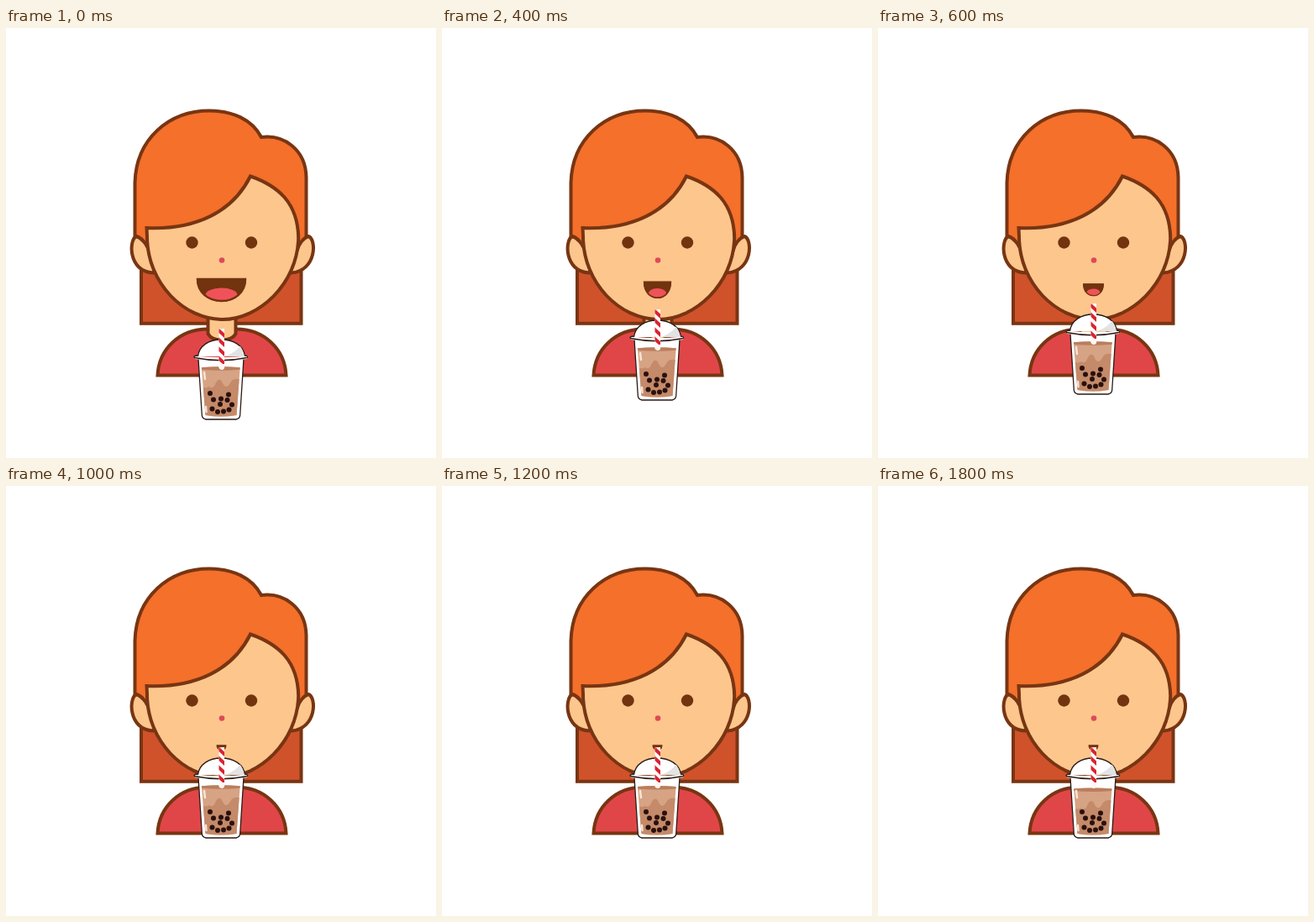
An HTML page for the animation above (2 s loop, 512 px wide and 512 px high).

```html
<!DOCTYPE html>
<html lang="en">
<head>
<meta charset="utf-8">
<title>Bubble tea</title>
<style>
html, body { margin: 0; width: 100%; height: 100%; overflow: hidden; background: #fff; }
svg { display: block; width: 100%; height: 100%; }
.line { stroke: #783512; stroke-width: 4; stroke-linejoin: miter; }
.skin { fill: #fcc68d; }
.ink { stroke: #2a1a14; stroke-width: 1.3; stroke-linejoin: round; }
</style>
</head>
<body>
<svg viewBox="0 0 512 512">
  <defs>
    <clipPath id="mouthClip"><path d="M227 298H286C286 316 272 326 257 326C241 326 227 316 227 298Z"/></clipPath>
    <clipPath id="strawClip"><path d="M253.5 358.5L260 358V400H253.5Z"/></clipPath>
    <clipPath id="teaClip"><path d="M232.5 400H279L274.5 461Q256 464 237.5 461Z"/></clipPath>
  </defs>

  <rect class="line" x="161" y="272" width="190.5" height="79.8" fill="#d0522a"/>
  <path class="line" fill="#e04648" d="M180.500 413.500C182 382 207 358.500 240 358.500H274C307 358.500 332 382 333.500 413.500Z"/>
  <path class="line skin" d="M240.500 342V364C246 374 268 374 273.500 364V342"/>
  <path class="line" fill="#f4702b" d="M153.500 262V184C155 132 194 98.500 242 98.500C270 98.500 293 109 304 130C330 126.500 357 144 357.500 178V262Z"/>
  <path class="line skin" d="M155.500 248C146 251 145 290 175 291.500L190 270L169 262C166 256 161 250 155.500 248Z"/>
  <path class="line skin" d="M360 248C370 251 370 289 340 291.500L325 270L347 264C349 257 354 250 360 248Z"/>
  <path class="line skin" d="M167.500 238C226 240.500 270 219 291 176.500C324 188 347.500 208 348.200 250C347 305 301 347 258 347C212 347 168 304 168 248Z"/>

  <g fill="#72330f"><circle cx="221.5" cy="255.500" r="7.200"/><circle cx="292" cy="255.500" r="7.200"/></g>
  <circle cx="257" cy="276.500" r="3.300" fill="#dd4a58"/>

  <g id="mouth">
    <g clip-path="url(#mouthClip)">
      <rect x="226" y="297" width="62" height="30" fill="#72330f"/>
      <ellipse cx="256.500" cy="318" rx="19" ry="8.500" fill="#f0525a"/>
    </g>
    <path d="M228 299H285C285 316 271 325 257 325C242 325 228 316 228 299Z" fill="none" stroke="#72330f" stroke-width="2.500"/>
  </g>

  <g id="cup">
    <path class="ink" fill="#fff" d="M229 394L233.300 461Q233.500 465 238 466H274Q278.500 465 278.700 461L283 394Z"/>
    <g clip-path="url(#teaClip)">
      <g id="tea">
        <path d="M230 404.500Q256 402 282 404.500V470H230Z" fill="#d6a384"/>
        <path d="M230 404.500Q256 402 282 404.500V406.500Q256 409 230 406.500Z" fill="#b97e5e"/>
        <path d="M230 424Q236 431 242 427Q247 431 250 422Q254 416 257 421Q262 433 268 421Q273 415 282 420V470H230Z" fill="#c48a69"/>
      </g>
      <path d="M236 410L237 418M238 451L238.500 457" stroke="#f7e2d6" stroke-width="2.500" stroke-linecap="round"/>
    </g>
    <g id="pearls" fill="#29110e"></g>
    <path class="ink" fill="#fff" d="M228.500 391C230 378 242 371 256 371C271 371 283 378 284.500 391"/>
    <path d="M261 391Q274 386 278.500 378.500Q283 384 283.500 391Z" fill="#e3e3e3"/>
    <path d="M224 390.500Q256 394 288 390.500L287 394Q256 399 225 394Z" fill="#fff"/>
    <path class="ink" d="M228.500 390Q222.500 390.500 224.500 392.500Q256 399 287 392.500Q289 390.500 284.500 390" fill="none"/>
    <path d="M253.500 358.500L260 358V403Q257 408 253.500 404Z" fill="#fff"/>
    <g clip-path="url(#strawClip)"><path id="stripes" stroke="#d92330" stroke-width="4"/></g>
    <circle cx="256.800" cy="403.500" r="3.400" fill="#fff6f0"/>
  </g>
</svg>
<script>
const $ = id => document.getElementById(id);
const STEP = 200, COUNT = 10;
const lift = [0, 8, 23, 30, 37, 47];
const mouthSize = [[1, 1], [1, 1], [.56, .72], [.42, .53], [.29, .35], [.2, .24]];
const pearls = [[243, 435], [265, 436.5], [247, 442.5], [256, 441.5], [263.5, 443],
  [255, 448], [269, 448.5], [245.5, 453.5], [252, 457], [259, 456.5], [265.5, 454.5]];

$("pearls").innerHTML = pearls.map(([x, y]) => `<circle cx="${x}" cy="${y}" r="3"/>`).join("");
$("stripes").setAttribute("d", Array.from({ length: 4 }, (_, i) =>
  `M251 ${358 + i * 11}l11 10`).join(""));

function draw(ms) {
  const step = Math.floor(ms / STEP) % COUNT;
  const pose = Math.min(step, lift.length - 1);
  const [sx, sy] = mouthSize[pose];
  const sip = Math.max(0, step - 5) * .8;
  $("cup").setAttribute("transform", `translate(0 ${-lift[pose]})`);
  $("tea").setAttribute("transform", `translate(0 ${sip})`);
  $("mouth").setAttribute("transform",
    `translate(256.5 311.5) scale(${sx} ${sy}) translate(-256.5 -311.5)`);
}

const start = performance.now();
function tick(now) {
  draw(Math.max(0, now - start));
  requestAnimationFrame(tick);
}
draw(0);
requestAnimationFrame(tick);
</script>
</body>
</html>
```
